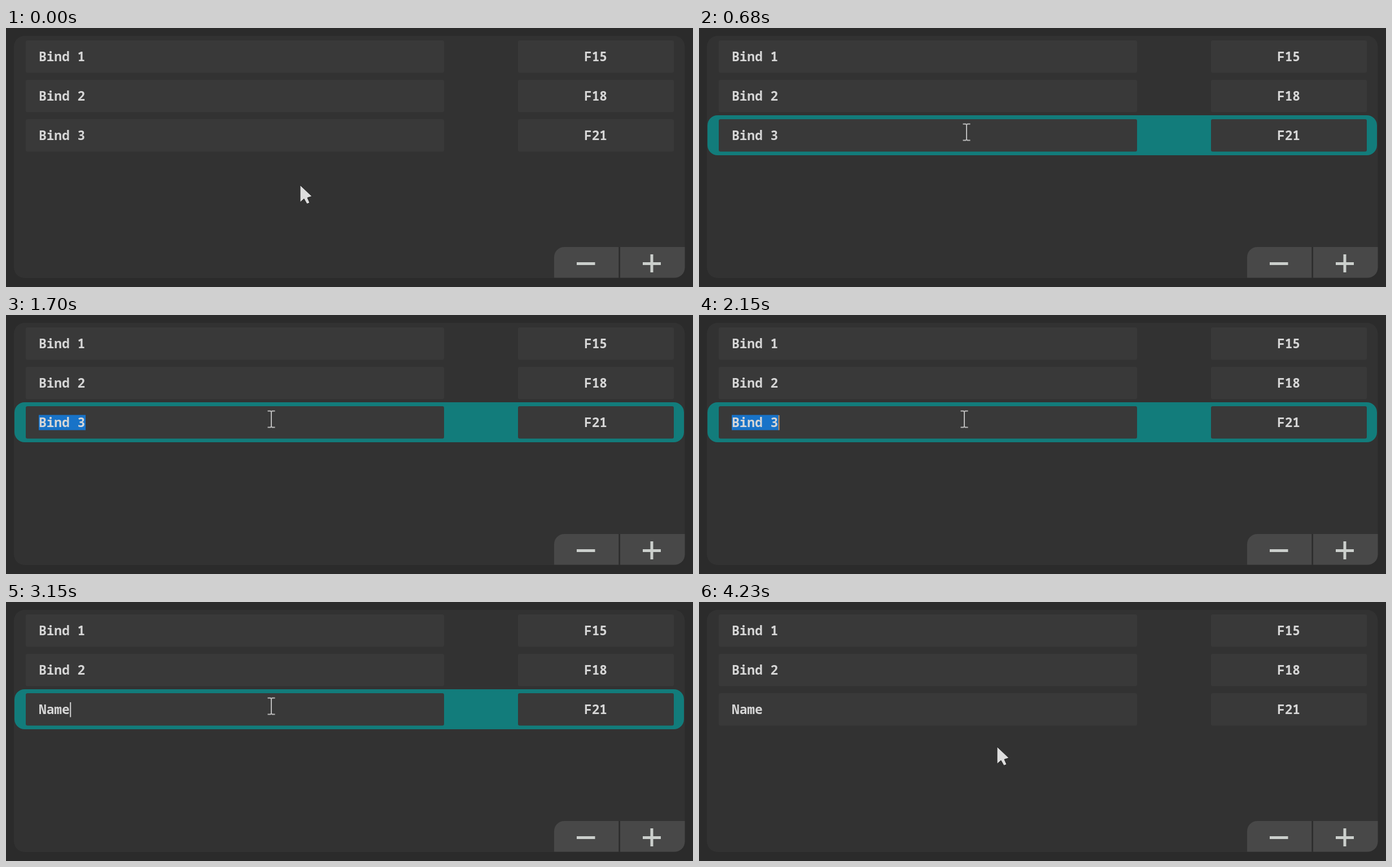
An HTML page that plays this animation: 1217 px wide and 460 px high, repeating every 4260 ms.

```html
<!DOCTYPE html>
<html lang="en">
<head>
<meta charset="utf-8">
<title>Renaming a bind</title>
<style>
  html, body { margin: 0; width: 100%; height: 100%; overflow: hidden; background: #2b2b2b; }
  svg { display: block; width: 1217px; height: 460px; }
  text { font: 600 22.8px "Noto Sans Mono", "DejaVu Sans Mono", monospace; fill: #d6d6d6; }
  .key { text-anchor: middle; }
  .field { fill: #393939; }
  .button { fill: #484848; }
  .sign { fill: #cbcfcc; }
</style>
</head>
<body>
<svg viewBox="0 0 1217 460">
  <rect x="14" y="14" width="1188.5" height="430" rx="19" fill="#323232"/>
  <rect id="highlight" x="15" y="155" width="1186" height="71" rx="18" fill="#127c7b"/>
  <g id="rows"></g>
  <rect id="selection" y="177.5" height="27" fill="#1873c8"/>
  <text id="name" x="58" y="198.5"></text>
  <rect id="caret" y="178" width="2" height="26.5" fill="#d0d0d0"/>
  <path class="button" d="M971 443.5V407a18 18 0 0 1 18-18h96.5v54.5z"/>
  <path class="button" d="M1088 389h114.500v36.500a18 18 0 0 1-18 18h-96.500z"/>
  <rect x="1085.5" y="389" width="2.5" height="54.5" fill="#2d2d2d"/>
  <path class="sign" d="M1011 416h32.500v5h-32.500z"/>
  <path class="sign" d="M1128 416h32v5h-32zM1141.500 402h5v32h-5z"/>
  <path id="arrow" d="M0 0V30.500L7 24.500L12 33.500L17 31.500L13 22.500L21 20z"
        fill="#dedede" stroke="#242424" stroke-width="1"/>
  <path id="beam" d="M-6.500-14.500h5l1.500 1.500l1.500-1.500h5M0-13V13M-6.500 14.500h5l1.500-1.500l1.500 1.500h5"
        fill="none" stroke="#bababa" stroke-width="2"/>
</svg>
<script>
const LOOP = 4260, BLINK = 530, TEXT_X = 58, ADVANCE = 13.68;
const FIRST_CLICK = 1060, DOUBLE_CLICK = 1260, TRIPLE_CLICK = 1430;
const KEY_TIMES = [2400, 2540, 2690, 2840];
const NEW_NAME = "Name";

// Pointer hotspot: time, x, y
const path = [
  [0, 521, 279], [70, 521, 279], [510, 474, 185], [680, 474, 185], [1090, 466, 185],
  [1260, 466, 185], [1700, 470, 185], [3920, 470, 185], [3990, 474, 187],
  [4230, 528, 257], [LOOP, 528, 257]
];

const byId = id => document.getElementById(id);
const show = (id, on) => byId(id).setAttribute("visibility", on ? "visible" : "hidden");

byId("rows").innerHTML = ["F15", "F18", "F21"].map((key, i) => {
  const y = 22 + 70 * i;
  return `<rect class="field" x="35" y="${y}" width="741" height="57.5" rx="3"/>
    <rect class="field" x="907" y="${y}" width="276" height="57.5" rx="3"/>
    ${i < 2 ? `<text x="${TEXT_X}" y="${y + 36.5}">Bind ${i + 1}</text>` : ""}
    <text class="key" x="1044.5" y="${y + 36.5}">${key}</text>`;
}).join("");

function pointerAt(t) {
  const i = path.findIndex(p => p[0] > t);
  const [t0, x0, y0] = path[i - 1], [t1, x1, y1] = path[i];
  const u = (t - t0) / (t1 - t0), k = u * u * (3 - 2 * u);
  return [x0 + (x1 - x0) * k, y0 + (y1 - y0) * k];
}

function draw(t) {
  const [x, y] = pointerAt(t);
  const hovering = y < 226, overField = y < 220;
  show("highlight", hovering);
  show("arrow", !overField);
  show("beam", overField);
  byId(overField ? "beam" : "arrow").setAttribute("transform", `translate(${x} ${y})`);

  const typed = KEY_TIMES.filter(k => k <= t).length;
  const name = typed ? NEW_NAME.slice(0, typed) : "Bind 3";
  byId("name").textContent = name;

  const selected = !typed && t >= DOUBLE_CLICK;
  const from = t < TRIPLE_CLICK ? 5 : 0;
  show("selection", selected);
  byId("selection").setAttribute("x", TEXT_X + from * ADVANCE);
  byId("selection").setAttribute("width", (6 - from) * ADVANCE + 1);

  const lastInput = typed ? KEY_TIMES[typed - 1] : FIRST_CLICK;
  const lit = Math.floor((t - lastInput) / BLINK) % 2 === 0;
  show("caret", t >= FIRST_CLICK && hovering && lit);
  byId("caret").setAttribute("x", TEXT_X + name.length * ADVANCE + 0.5);
  byId("caret").setAttribute("fill", selected ? "#c08a58" : "#d0d0d0");
}

function tick() {
  draw(performance.now() % LOOP);
  requestAnimationFrame(tick);
}
tick();
</script>
</body>
</html>
```
